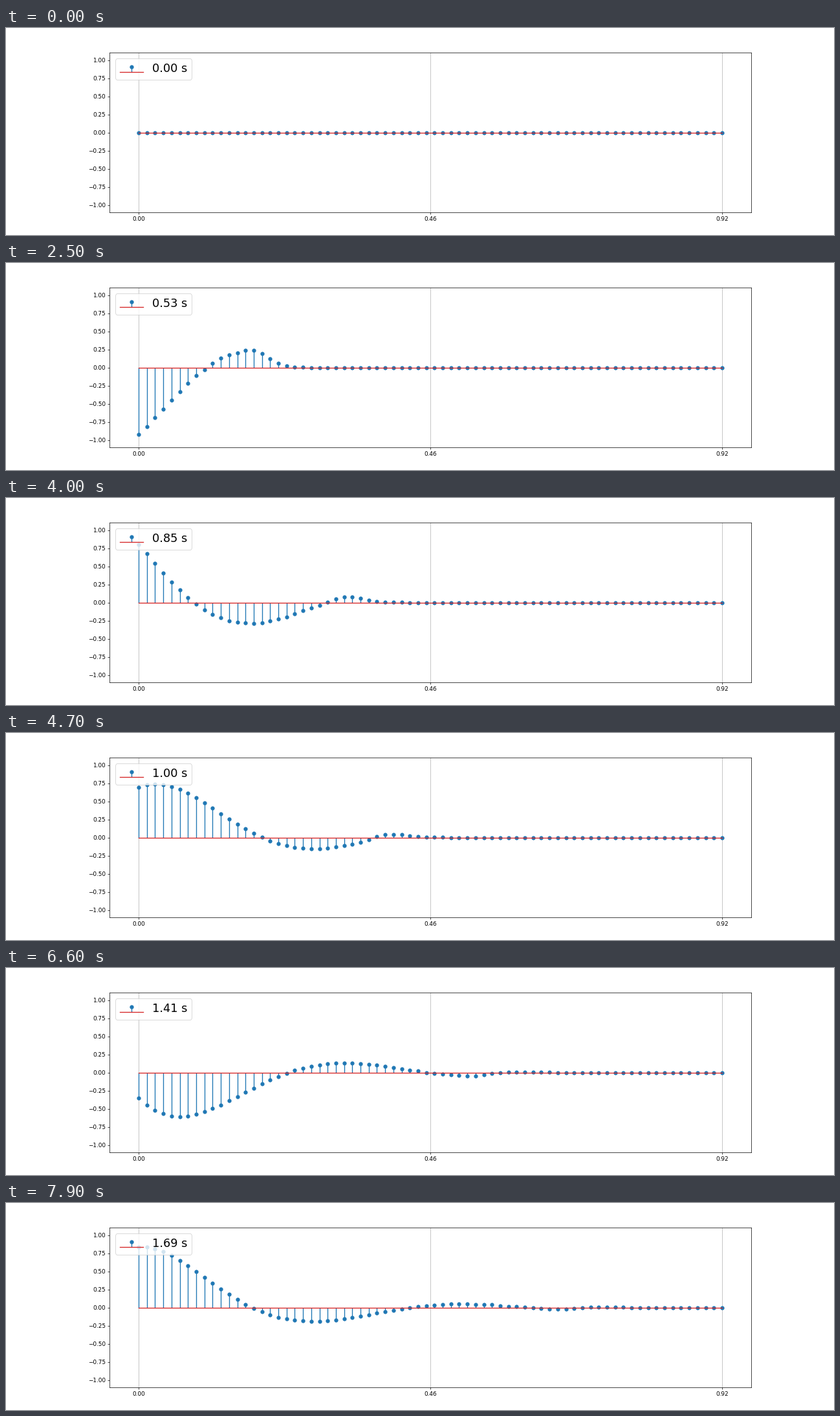
Animation, 1280 px wide and 320 px high, one loop 8000 ms. Source, as a matplotlib script:

```python
import numpy as np
import matplotlib.pyplot as plt
from matplotlib.animation import FuncAnimation

FRAMES = 80
INTERVAL = 100            # ms
DT = 1024 / 48000         # simulated seconds per frame
NODES = 72
LENGTH = 0.92

# Damped chain of coupled pendulums, in nodes and frames
SPEED2 = 0.75 ** 2        # coupling
RESTORE = 0.0253          # pull of each node back to rest
DAMPING = 0.062
SUBSTEPS = 16


def drive(n):
    """Displacement of the first node at frame time n."""
    return 0.95 * np.sin(max(0.0, 0.18827 * n - 0.239))


def simulate():
    h = 1 / SUBSTEPS
    drag = DAMPING * h / 2
    prev = np.zeros(NODES)
    cur = np.zeros(NODES)
    states = [cur.copy()]
    for step in range(1, (FRAMES - 1) * SUBSTEPS + 1):
        mid = cur[1:-1]
        force = SPEED2 * (cur[2:] - 2 * mid + cur[:-2]) - RESTORE * mid
        new = np.zeros(NODES)
        new[1:-1] = (2 * mid - (1 - drag) * prev[1:-1] + h * h * force) / (1 + drag)
        new[0] = drive(step * h)
        prev, cur = cur, new
        if step % SUBSTEPS == 0:
            states.append(cur.copy())
    return states


x = np.linspace(0, LENGTH, NODES)
states = simulate()

fig, ax = plt.subplots(figsize=(20, 5), dpi=64)
stem = ax.stem(x, states[0], label="0.00 s")
ax.set_ylim(-1.1, 1.1)
ax.set_xticks([0, LENGTH / 2, LENGTH])
ax.grid(axis="x")
legend = ax.legend(loc="upper left", fontsize=20)
label = legend.get_texts()[0]


def update(n):
    y = states[n]
    stem.markerline.set_ydata(y)
    stem.stemlines.set_segments([[(a, 0), (a, b)] for a, b in zip(x, y)])
    label.set_text(f"{n * DT:.2f} s")
    return stem.markerline, stem.stemlines, label


anim = FuncAnimation(fig, update, frames=FRAMES, interval=INTERVAL,
                     init_func=lambda: update(0), repeat=True, repeat_delay=0)
plt.show()
```
